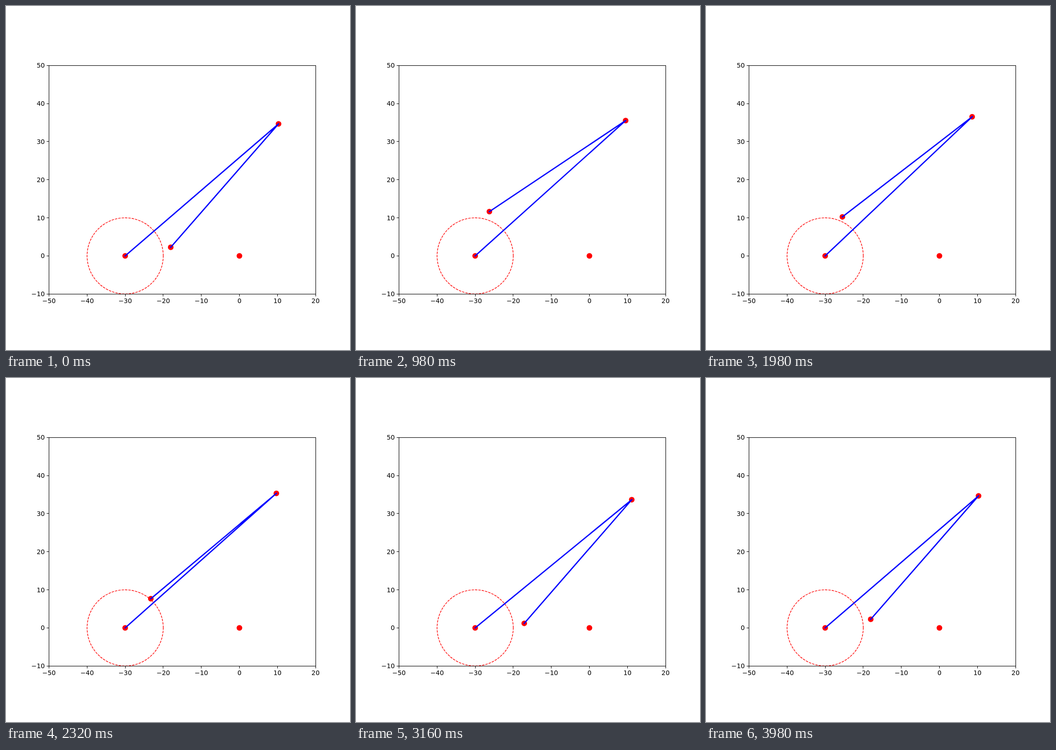
Recreate the animation shown at these times as an HTML page. Size 748x748 px, loop 4 s.

```html
<!DOCTYPE html>
<html>
<head>
<meta charset="utf-8">
<style>
  html, body { margin: 0; width: 100%; height: 100%; overflow: hidden; background: #fff; }
  svg { display: block; }
  text { font: 13.89px "DejaVu Sans", sans-serif; }
</style>
</head>
<body>
<svg id="plot" width="748" height="748" viewBox="0 0 748 748"></svg>
<script>
const UNIT = 8.2814, ORIGIN_X = 507.57, ORIGIN_Y = 543.37;
const BASE_X = ORIGIN_X - 30 * UNIT;
const UPPER = 440, LOWER = 356.3;
const CYCLE = 199;

// Keys are [step, value]; both curves repeat after CYCLE steps.
const elbowKeys = [[0, 592.6], [28, 590], [54, 585.3], [71, 581.8], [81, 580.3], [99, 578.7],
  [108, 583.4], [134, 597.7], [144, 602.1], [158, 599.6], [189, 595.5]];
const bendKeys = [[0, 8.14], [28, -2.16], [71, -10.92], [99, -5.78], [134, 3.16], [158, 9.69]];

function keyAt(keys, i) {
  const turn = Math.floor(i / keys.length);
  const [step, value] = keys[i - turn * keys.length];
  return [step + turn * CYCLE, value];
}

function slopeAt(keys, i) {
  const [a, u] = keyAt(keys, i - 1), [b, v] = keyAt(keys, i), [c, w] = keyAt(keys, i + 1);
  return ((v - u) / (b - a) * (c - b) + (w - v) / (c - b) * (b - a)) / (c - a);
}

// Periodic cubic Hermite curve through the keys.
function curve(keys, step) {
  step %= CYCLE;
  const i = keys.findLastIndex(k => k[0] <= step);
  const [a, u] = keyAt(keys, i), [b, v] = keyAt(keys, i + 1);
  const h = b - a, s = (step - a) / h, r = 1 - s;
  return u * r * r * (1 + 2 * s) + v * s * s * (3 - 2 * s)
    + h * s * r * (slopeAt(keys, i) * r - slopeAt(keys, i + 1) * s);
}

const label = v => String(v).replace('-', '\u2212');
const snap = v => Math.floor(v) + 0.5;
const dot = (id, x, y) => `<circle id="${id}" cx="${x}" cy="${y}" r="6.1" fill="red"/>`;

let axes = '';
for (let v = -50; v <= 20; v += 10) {
  const x = ORIGIN_X + v * UNIT;
  axes += `<path d="M${snap(x)} 626.5v5"/><text x="${x}" y="645.8" text-anchor="middle">${label(v)}</text>`;
}
for (let v = -10; v <= 50; v += 10) {
  const y = ORIGIN_Y - v * UNIT;
  axes += `<path d="M93.5 ${snap(y)}h-5"/><text x="84.4" y="${y + 5}" text-anchor="end">${label(v)}</text>`;
}

const R = 10 * UNIT;
document.getElementById('plot').innerHTML = `
  <clipPath id="area"><rect x="93.5" y="129.3" width="579.7" height="496.9"/></clipPath>
  <path d="M${BASE_X + R} ${ORIGIN_Y}a${R} ${R} 0 1 0 ${-2 * R} 0a${R} ${R} 0 1 0 ${2 * R} 0"
    fill="none" stroke="red" stroke-width="1.39" stroke-dasharray="5.14 2.22" clip-path="url(#area)"/>
  ${dot('base', BASE_X, ORIGIN_Y)}${dot('pivot', ORIGIN_X, ORIGIN_Y)}${dot('elbow', 0, 0)}${dot('tip', 0, 0)}
  <path id="links" fill="none" stroke="blue" stroke-width="2.78" stroke-linecap="square"/>
  <g stroke="#000" stroke-width="1.11"><rect x="93.5" y="129.5" width="580" height="497" fill="none"/>
  <g style="--t:0">${axes.replace(/<text/g, '<text stroke="none"')}</g></g>`;

const [elbow, tip, links] = ['elbow', 'tip', 'links'].map(id => document.getElementById(id));

function place(el, x, y) {
  el.setAttribute('cx', x);
  el.setAttribute('cy', y);
}

function draw(now) {
  const step = Math.floor(now / 20) % 200;
  const x = curve(elbowKeys, step);
  const lift = Math.acos((x - BASE_X) / UPPER);
  const y = ORIGIN_Y - UPPER * Math.sin(lift);
  const angle = lift + curve(bendKeys, step) * Math.PI / 180;
  const tipX = x - LOWER * Math.cos(angle), tipY = y + LOWER * Math.sin(angle);
  place(elbow, x, y);
  place(tip, tipX, tipY);
  links.setAttribute('d', `M${BASE_X} ${ORIGIN_Y}L${x} ${y}M${x} ${y}L${tipX} ${tipY}`);
}

const start = performance.now();
function loop() {
  draw(performance.now() - start);
  requestAnimationFrame(loop);
}
loop();
</script>
</body>
</html>
```
